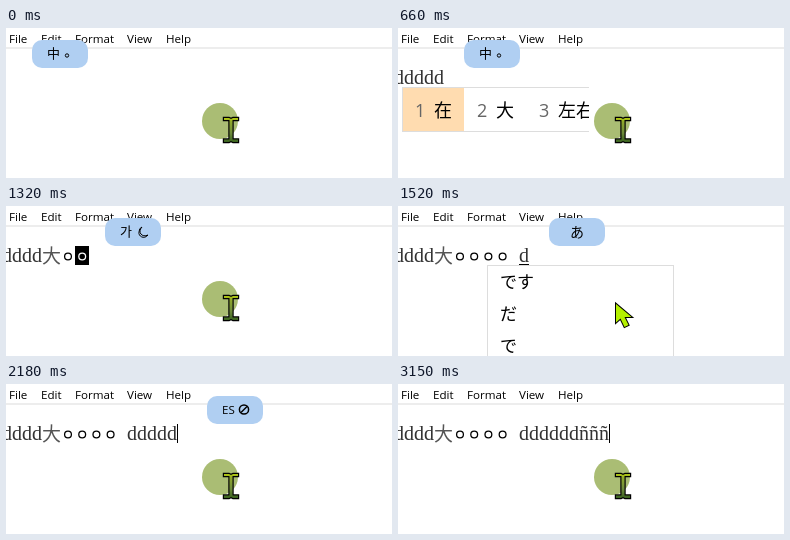
An HTML page with a canvas that plays this animation: 386 by 150 pixels, repeating every 3350 ms.

```html
<!DOCTYPE html>
<html lang="en">
<head>
<meta charset="utf-8">
<style>
html, body { margin: 0; width: 100%; height: 100%; overflow: hidden; background: #fff; }
canvas { display: block; }
</style>
</head>
<body>
<canvas id="stage" width="386" height="150"></canvas>
<script>
const ctx = document.getElementById('stage').getContext('2d');
const LOOP = 3350;
const UI = '"Open Sans", "Noto Sans CJK SC", sans-serif';
const CJK = '"Noto Sans CJK SC", "Noto Sans CJK JP", "Noto Sans CJK", sans-serif';
const SERIF = '"Liberation Serif", serif';
const INK = '#333';

// Each step lists only what changes. Typed cells are 10 px wide, starting at x = -4.
const steps = [
  [0, { latin: 0, han: false, rings: 0, tail: '', mode: 'zh', at: -4, caret: null,
        pointer: 'beam', line: null, list: null, menu: null, block: false }],
  [200, { latin: 1, at: 6, caret: 6 }],
  [350, { latin: 2, at: 16, caret: 16, pointer: null }],
  [420, { latin: 3, at: 26, caret: 26 }],
  [490, { latin: 4, at: 36, caret: 36 }],
  [660, { latin: 5, caret: null, pointer: 'beam', line: ['dots', 36, 46],
          list: { x: 4, y: 59, items: ['在', '大', '左右'], clip: 187 } }],
  [690, { latin: 6, pointer: 'arrow', line: ['dots', 36, 56],
          list: { x: 36, y: 61, items: ['大', '大大', '大大d'] } }],
  [800, { list: { x: 36, y: 61, items: ['大大', '大', '大的'] } }],
  [970, { latin: 7, line: ['dots', 36, 66] }],
  [1000, { list: { x: 36, y: 61, items: ['磊', '㕆', '大厦d'] } }],
  [1120, { latin: 4, han: true, rings: 2, block: true, mode: 'ko', at: 55,
           line: null, list: null, pointer: null }],
  [1320, { at: 69, pointer: 'beam' }],
  [1520, { rings: 4, block: false, tail: 'd', mode: 'ja', at: 121, pointer: 'arrow',
           line: ['solid', 121, 131], menu: { x: 89, y: 59, w: 187 } }],
  [1720, { tail: 'ddd', line: ['solid', 121, 151], menu: { x: 121, y: 61, w: 155 } }],
  [1820, { tail: 'ddddd', line: ['solid', 121, 171], menu: null, mode: null, pointer: 'beam' }],
  [2120, { line: null, caret: 171 }],
  [2180, { mode: 'es', at: 171 }],
  [2660, { tail: 'ddddddñ', at: 181, caret: 191, pointer: null }],
  [2750, { at: 191 }],
  [2890, { tail: 'ddddddññ', caret: 201 }],
  [2920, { at: 201, pointer: 'beam' }],
  [3150, { tail: 'ddddddñññ', caret: 211, mode: null }]
];

function stateAt(t) {
  return Object.assign({}, ...steps.filter(s => s[0] <= t).map(s => s[1]));
}

function rect(x, y, w, h, color) {
  ctx.fillStyle = color;
  ctx.fillRect(x, y, w, h);
}

function label(str, x, y, font, color = '#000') {
  ctx.font = font;
  ctx.fillStyle = color;
  ctx.fillText(str, x, y);
}

function ring(x, y, r, width, color = '#000') {
  ctx.beginPath();
  ctx.arc(x, y, r, 0, 7);
  ctx.lineWidth = width;
  ctx.strokeStyle = color;
  ctx.stroke();
}

function stroke(points, width, color = '#000') {
  ctx.beginPath();
  points.forEach(([x, y]) => ctx.lineTo(x, y));
  ctx.lineWidth = width;
  ctx.strokeStyle = color;
  ctx.stroke();
}

function drawMenuBar() {
  const items = [['File', 3], ['Edit', 35], ['Format', 69], ['View', 121], ['Help', 160]];
  items.forEach(([s, x]) => label(s, x, 15, '11.6px ' + UI));
  rect(0, 19, 386, 2, '#ededed');
}

function drawText(s) {
  const type = (str, x) =>
    [...str].forEach((c, i) => label(c, x + i * 10, 56, '20px ' + SERIF, INK));
  type('d'.repeat(s.latin), -4);
  type(s.tail, 121);
  if (s.han) label('大', 36, 57, '300 19px ' + CJK, '#555');
  if (s.block) rect(69, 40, 14, 19, '#000');
  for (let i = 0; i < s.rings; i++)
    ring(62 + 14.2 * i, 50.5, 3.4, 1.3, s.block && i === s.rings - 1 ? '#fff' : '#000');
  if (s.line) {
    const [kind, from, to] = s.line;
    if (kind === 'solid') rect(from, 58, to - from, 2, '#000');
    else for (let x = from; x < to; x += 3) rect(x, 59, 2, 1, '#000');
  }
  if (s.caret !== null) rect(s.caret, 40, 1, 19, '#000');
}

function drawBadge(mode, x) {
  ctx.beginPath();
  ctx.roundRect(x, 12, 56, 28, 10);
  ctx.fillStyle = '#b0cff2';
  ctx.fill();
  if (mode === 'zh') {
    label('中', x + 15, 30, '13px ' + CJK);
    ring(x + 35, 27.5, 1.7, 1);
  } else if (mode === 'ko') {
    label('가', x + 15, 30, '13px "Noto Sans CJK KR", ' + CJK);
    ctx.beginPath();
    ctx.moveTo(x + 37, 21);
    ctx.bezierCurveTo(x + 32, 26, x + 37, 32, x + 43, 29);
    ctx.bezierCurveTo(x + 39, 34, x + 33, 30, x + 34, 26);
    ctx.quadraticCurveTo(x + 34, 22, x + 37, 21);
    ctx.lineWidth = 1;
    ctx.strokeStyle = '#000';
    ctx.stroke();
  } else if (mode === 'ja') {
    label('あ', x + 21, 31, '14px ' + CJK);
  } else {
    label('ES', x + 15, 30, '11.5px ' + UI);
    ring(x + 37, 25.5, 4.6, 1.5);
    stroke([[x + 34, 28.5], [x + 40, 22.5]], 1.5);
  }
}

function drawList({ x, y, items, clip }) {
  ctx.font = '18px ' + CJK;
  const widths = items.map(s => Math.round(ctx.measureText(s).width + 43.6));
  const cells = widths.reduce((a, b) => a + b);
  const full = cells + 115;
  ctx.save();
  ctx.beginPath();
  ctx.rect(x, y, clip || full, 45);
  ctx.clip();
  rect(x, y, full, 45, '#ddd');
  rect(x + 1, y + 1, full - 2, 43, '#fff');
  rect(x + 1, y + 1, widths[0] - 1, 43, '#ffdcb0');
  let left = x;
  items.forEach((s, i) => {
    label(i + 1, left + 13, y + 30, '18px ' + UI, '#666');
    label(s, left + 32, y + 30, '18px ' + CJK);
    left += widths[i];
  });
  const bar = x + cells, mid = y + 23;
  rect(bar, y, 1, 45, '#ddd');
  rect(bar + 65, y, 1, 45, '#ddd');
  stroke([[bar + 17, mid - 5], [bar + 12, mid], [bar + 17, mid + 5]], 1, '#aaa');
  stroke([[bar + 48, mid - 5], [bar + 53, mid], [bar + 48, mid + 5]], 1);
  ring(bar + 90, mid, 7.5, 1);
  rect(bar + 87, mid - 3, 2, 2, '#000');
  rect(bar + 92, mid - 3, 2, 2, '#000');
  ctx.beginPath();
  ctx.arc(bar + 90, mid, 4, 0.4, Math.PI - 0.4);
  ctx.stroke();
  ctx.restore();
}

function drawMenu({ x, y, w }) {
  rect(x, y, w, 96, '#ddd');
  rect(x + 1, y + 1, w - 2, 94, '#fff');
  ['です', 'だ', 'で'].forEach((s, i) => label(s, x + 13, y + 23 + 32 * i, '17px ' + CJK));
}

function paintShape(path, fill, width) {
  ctx.lineWidth = width;
  ctx.lineJoin = 'miter';
  ctx.strokeStyle = '#000';
  ctx.stroke(path);
  ctx.fillStyle = fill;
  ctx.fill(path);
}

function drawPointer(kind) {
  if (kind === 'arrow') {
    const arrow = new Path2D('M218 98V116.5l4.500-4 4 8.500 4-2-4-8h7z');
    paintShape(arrow, '#b4f000', 2);
    return;
  }
  const shade = ctx.createLinearGradient(0, 88, 0, 116);
  shade.addColorStop(0, '#c8dc00');
  shade.addColorStop(0.2, '#8fa82a');
  shade.addColorStop(0.6, '#6f8c3c');
  shade.addColorStop(1, '#2f5a18');
  const beam = new Path2D(
    'M218 90h5l2 1 2-1h5v2h-5.500v19.500h5.500v2.500h-5l-2-1-2 1h-5v-2.500h5.500v-19.500h-5.500z');
  paintShape(beam, shade, 2.4);
}

function draw(t) {
  const s = stateAt(t);
  rect(0, 0, 386, 150, '#fff');
  drawMenuBar();
  drawText(s);
  ctx.beginPath();
  ctx.arc(214, 93, 18, 0, 7);
  ctx.fillStyle = '#aabd74';
  ctx.fill();
  if (s.list) drawList(s.list);
  if (s.menu) drawMenu(s.menu);
  if (s.mode) drawBadge(s.mode, s.at + 30);
  if (s.pointer) drawPointer(s.pointer);
}

function tick() {
  draw(performance.now() % LOOP);
  requestAnimationFrame(tick);
}
tick();
</script>
</body>
</html>
```
